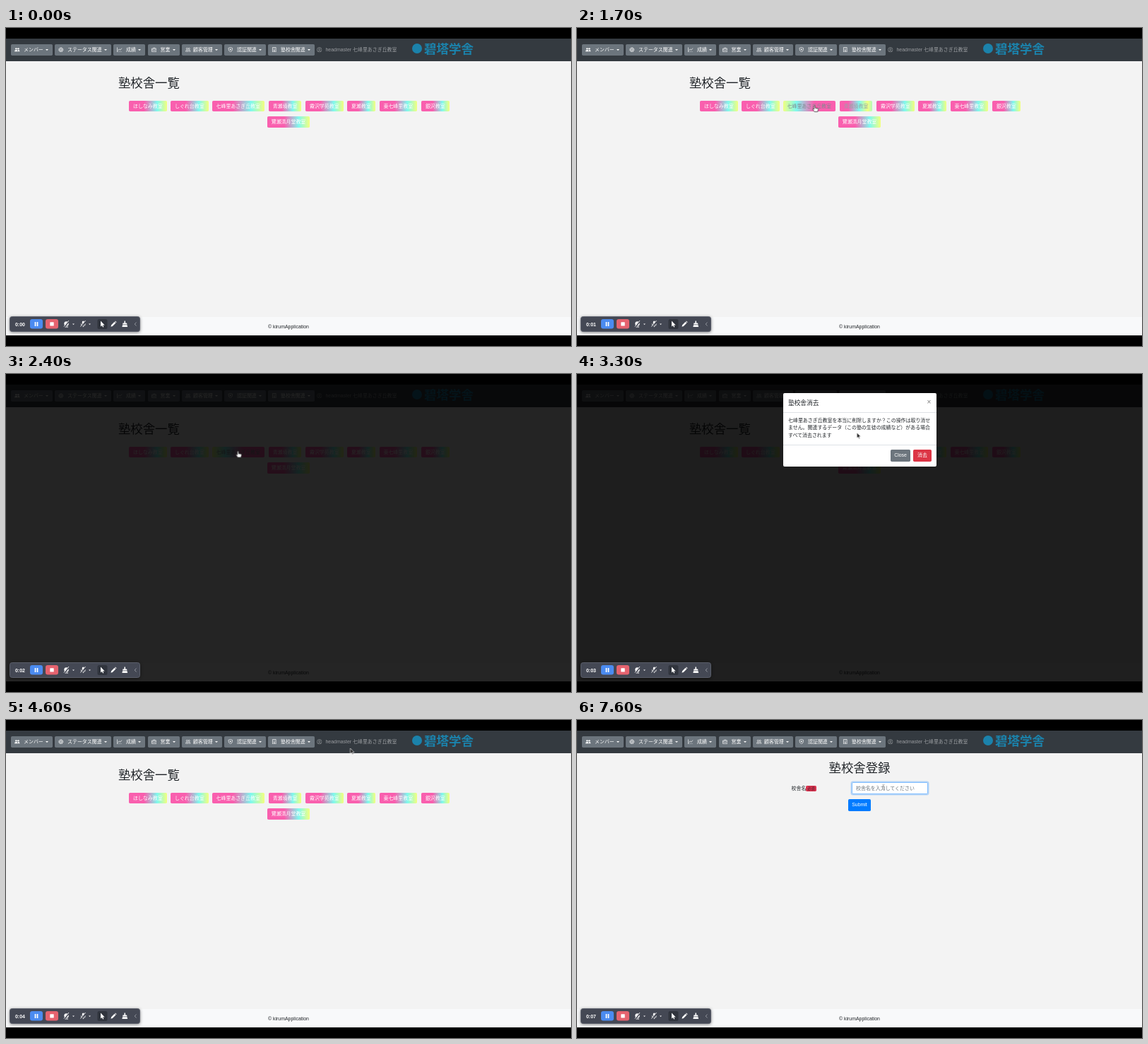
These frames come from a looping animation (800x450 px, 8000 ms). An HTML page:

```html
<!DOCTYPE html>
<html lang="ja">
<head>
<meta charset="utf-8">
<title>塾校舎一覧</title>
<style>
html, body { margin: 0; width: 100%; height: 100%; overflow: hidden; background: #000; }
body { font: 6.95px/16px "Liberation Sans", "Noto Sans CJK JP", "Noto Sans CJK", sans-serif; color: #212529; }
.stage { position: relative; width: 800px; height: 450px; overflow: hidden; }
.layer { position: absolute; inset: 0; }
.page { clip-path: inset(15px 0); background: #f3f3f3; }
.t, .btn, .box, svg.i { position: absolute; white-space: nowrap; }
.box { box-sizing: border-box; }
h1 { margin: 0; font-size: 17.36px; font-weight: 500; font-weight: 400; line-height: 24px; }

/* navigation */
.bar { left: 0; top: 15px; width: 800px; height: 32px; background: #343a40; }
.btn { left: var(--x); top: var(--y, 22.5px); width: var(--w); height: 16.5px; border-radius: 1.8px; color: #fff; background: #6c757d; text-align: center; }
.nav span { position: absolute; left: 18px; }
.nav svg { position: absolute; left: 5.2px; top: 4.4px; width: 7.6px; height: 7.6px; }
.nav::after { content: ""; position: absolute; right: 6px; top: 7px; border: 2px solid transparent; border-top-color: #fff; border-bottom: 0; }
.user { color: #9a9da0; }
.mark { left: 575px; top: 22px; width: 14px; height: 14px; border-radius: 50%; background: #1b82ab; }
.word { left: 592px; top: 18px; font-size: 17.5px; line-height: 24px; font-weight: 700; color: #1b82ab; }
.foot { left: 0; top: 409px; width: 800px; height: 26px; background: #f8f9fa; }

/* gradient buttons */
.pill {
  top: var(--y, 102.5px); height: 15.8px; line-height: 15.6px;
  background: linear-gradient(90deg, #f95fae 0 20%, #7ff8ee 37%, #f2ff80 50%, #7ff8ee 63%, #f95fae 80%) 0 0 / 200% 100%;
}

/* dropdown and dialog */
.menu { left: 371px; top: 40.5px; width: 70px; height: 35px; background: #fff; border: .5px solid #ccc; border-radius: 1.8px; }
.item { left: 371.5px; width: 69px; height: 14px; line-height: 13.5px; text-indent: 22.5px; }
.item svg { position: absolute; left: 10.5px; top: 3px; width: 7.6px; height: 7.6px; }
.shade { background: #000; }
.dialog { left: 292px; top: 27px; width: 217px; height: 104px; background: #fff; border-radius: 2px; }
.dialog hr { position: absolute; left: 0; width: 100%; margin: 0; border: 0; height: .5px; background: #dee2e6; }
.dialog p { position: absolute; left: 7px; top: 34px; margin: 0; line-height: 10.4px; }
.x { right: 0; top: 0; width: 21px; height: 25px; line-height: 25px; text-align: center; font-size: 10px; color: #808080; }
.x i { position: absolute; inset: 0; background: #1e1c1c; }

/* form */
.field { left: 389px; top: 88px; width: 108px; height: 17px; background: #fff; border: .6px solid #ced4da; border-radius: 1.8px; }
.glow { border-color: #80bdff; box-shadow: 0 0 0 1.5px rgba(0, 123, 255, .25); background: none; }
.badge { left: 324px; top: 93px; width: 15px; height: 8px; line-height: 8px; font-size: 5.2px; text-align: center; color: #451525; background: #dc3550; border-radius: 1.8px; }

/* recorder */
.clock { left: 13px; top: 414.5px; height: 9px; overflow: hidden; font-weight: 700; line-height: 9px; color: #fff; display: flex; }
.clock i { font-style: normal; width: 4px; white-space: pre-line; }

/* motion */
.a { animation: 8s linear infinite; }
.hard { animation: 8s step-end infinite; }
.list { animation-name: list; }
.form { animation-name: form; }
.drop { animation-name: drop; }
.pick { animation-name: pick; }
.focus { animation-name: focus; }
.caret { animation-name: caret; }
.digit { animation-name: digit; }
.shade { animation-name: shade; }
.fade { animation-name: fade; }
.slide { animation-name: slide; }
.dark { animation-name: dark; }
.sweep { animation-name: sweep; }
.brush { animation-name: brush; }
.move { animation-name: move; }
.arrow { animation-name: arrow; }
.hand { animation-name: hand; }
.beam { animation-name: beam; }
@keyframes list { 0% { opacity: 1 } 77.5%, 100% { opacity: 0 } }
@keyframes form { 0% { opacity: 0 } 77.5%, 100% { opacity: 1 } }
@keyframes drop { 0% { opacity: 0 } 66.25% { opacity: 1 } 77.5%, 100% { opacity: 0 } }
@keyframes pick { 0% { background: #fff; color: #212529 } 72.5%, 100% { background: #007bff; color: #fff } }
@keyframes focus { 0% { opacity: 0 } 88.75%, 100% { opacity: 1 } }
@keyframes caret { 0% { opacity: 0 } 88.75% { opacity: 1 } 95%, 100% { opacity: 0 } }
@keyframes digit {
  0% { transform: none } 15% { transform: translateY(-9px) } 27.5% { transform: translateY(-18px) }
  40% { transform: translateY(-27px) } 52.5% { transform: translateY(-36px) } 65% { transform: translateY(-45px) }
  77.5% { transform: translateY(-54px) } 90%, 100% { transform: translateY(-63px) }
}
@keyframes shade { 0%, 28.19% { opacity: 0 } 30.06%, 55.5% { opacity: .875 } 57.38%, 100% { opacity: 0 } }
@keyframes fade { 0%, 30.06% { opacity: 0 } 31.94%, 53.69% { opacity: 1 } 55.56%, 100% { opacity: 0 } }
@keyframes slide {
  0% { transform: translateY(-21.7px) }
  30.06% { transform: translateY(-21.7px); animation-timing-function: ease-out }
  33.81% { transform: none }
  53.69% { transform: none; animation-timing-function: ease-out }
  57.44%, 100% { transform: translateY(-21.7px) }
}
@keyframes dark { 0% { opacity: 0 } 49.5%, 100% { opacity: 1 } }
@keyframes sweep {
  0%, 18.75% { background-position: 0 0; color: #fff }
  21.25%, 30.5% { background-position: 100% 0; color: #808890 }
  36%, 100% { background-position: 0 0; color: #fff }
}
@keyframes brush {
  0%, 17.5% { background-position: 0 0; color: #fff }
  19.5% { background-position: 50% 0; color: #909aa0 }
  21.25% { background-position: 14% 0; color: #98a4a8 }
  24%, 100% { background-position: 0 0; color: #fff }
}
@keyframes move {
  0%, 8.75% { transform: translate(808px, 300px) }
  15% { transform: translate(541px, 165px) }
  18.75% { transform: translate(395px, 116px) }
  21.25% { transform: translate(336.5px, 110px) }
  26.25%, 36.25% { transform: translate(328.5px, 109.5px) }
  43.75% { transform: translate(430px, 70px) }
  50%, 55% { transform: translate(488.5px, 40px) }
  57.5%, 60% { transform: translate(487.5px, 40px) }
  65%, 67.5% { transform: translate(425px, 31px) }
  73.75%, 81.25% { transform: translate(417.5px, 64px) }
  85% { transform: translate(430px, 92px) }
  90%, 100% { transform: translate(434px, 95px) }
}
@keyframes arrow {
  0% { opacity: 1 } 18.2% { opacity: 0 } 30.5% { opacity: 1 } 49.5% { opacity: 0 } 56.25% { opacity: 1 }
  63% { opacity: 0 } 77.5% { opacity: 1 } 84.5%, 100% { opacity: 0 }
}
@keyframes hand {
  0% { opacity: 0 } 18.2% { opacity: 1 } 30.5% { opacity: 0 } 49.5% { opacity: 1 } 56.25% { opacity: 0 }
  63% { opacity: 1 } 77.5%, 100% { opacity: 0 }
}
@keyframes beam { 0% { opacity: 0 } 84.5%, 100% { opacity: 1 } }
</style>
</head>
<body>
<svg width="0" height="0" style="position:absolute">
  <defs fill="none">
    <symbol id="people" viewBox="0 0 16 16"><g fill="currentColor"><circle cx="5" cy="5" r="2.6"/><circle cx="11.5" cy="5" r="2.6"/><path d="M0 13q0-4.500 5-4.500t5 4.500zM11 13q0-3-1-4.300 6-.8 6 4.300z"/></g></symbol>
    <symbol id="gear" viewBox="0 0 16 16"><g fill="none" stroke="currentColor" stroke-width="1.400"><circle cx="8" cy="8" r="6.500" stroke-dasharray="3.400 1.700"/><circle cx="8" cy="8" r="5"/><circle cx="8" cy="8" r="2.200"/></g></symbol>
    <symbol id="graph" viewBox="0 0 16 16"><path d="M1 1v14h14M3 11l4-5 3 3 5-6" fill="none" stroke="currentColor" stroke-width="1.400"/></symbol>
    <symbol id="case" viewBox="0 0 16 16"><path d="M1 4.500h14v9H1zM5.500 4.500v-2h5v2M1 8q7 3 14 0" fill="none" stroke="currentColor" stroke-width="1.400"/></symbol>
    <symbol id="crowd" viewBox="0 0 16 16"><g fill="none" stroke="currentColor" stroke-width="1.300"><circle cx="5" cy="5" r="2.300"/><circle cx="11" cy="5" r="2.300"/><path d="M1 13q0-4 4-4t4 4zM9.500 9.500q5-1.500 5.500 3.500h-4"/></g></symbol>
    <symbol id="shield" viewBox="0 0 16 16"><path d="M8 1l6 2q.5 9-6 12-6.500-3-6-12z" fill="none" stroke="currentColor" stroke-width="1.400"/><path d="M8 5v5M6 7h4" stroke="currentColor" stroke-width="1.800"/></symbol>
    <symbol id="house" viewBox="0 0 16 16"><path d="M3 1h10v14H9.500v-3h-3v3H3zM5.500 4h1.500M9 4h1.500M5.500 7h1.500M9 7h1.500M5.500 10h5" fill="none" stroke="currentColor" stroke-width="1.400"/></symbol>
    <symbol id="rows" viewBox="0 0 16 16"><path d="M1 2h6M1 6h5M1 10h6M1 14h5M10 1h4v14h-4z" fill="none" stroke="currentColor" stroke-width="1.600"/></symbol>
    <symbol id="face" viewBox="0 0 16 16"><g fill="none" stroke="currentColor" stroke-width="1.300"><circle cx="8" cy="8" r="7"/><circle cx="8" cy="6.500" r="2.500"/><path d="M3.500 13q4.500-5 9 0"/></g></symbol>
  </defs>
</svg>

<div class="stage">
  <div class="layer page">
    <div class="box foot"></div>
    <div class="t" style="left:371px;top:414.500px">© kirumApplication</div>

    <div class="layer hard list">
      <h1 class="t" style="left:159px;top:66px">塾校舎一覧</h1>
      <div class="btn pill" style="--x:174px;--w:53.500px">ほしなみ教室</div>
      <div class="btn pill" style="--x:233px;--w:53.500px">しぐれ台教室</div>
      <div class="btn pill a sweep" style="--x:292px;--w:73.500px">七峰里あさぎ丘教室</div>
      <div class="btn pill a brush" style="--x:372px;--w:46px">青瀬境教室</div>
      <div class="btn pill" style="--x:424px;--w:53.500px">霧沢学苑教室</div>
      <div class="btn pill" style="--x:483px;--w:39.500px">夏瀬教室</div>
      <div class="btn pill" style="--x:528.500px;--w:53.500px">東七峰里教室</div>
      <div class="btn pill" style="--x:588px;--w:39.500px">銀沢教室</div>
      <div class="btn pill" style="--x:370px;--y:125px;--w:60px">鷺瀬清月堂教室</div>
    </div>

    <div class="layer hard form">
      <h1 class="t" style="left:356.600px;top:55.500px">塾校舎登録</h1>
      <div class="t" style="left:303.500px;top:89px">校舎名</div>
      <div class="box badge">必須</div>
      <div class="box field"></div>
      <div class="box field glow hard focus"></div>
      <div class="t" style="left:395px;top:89px;color:#6c757d">校舎名を入力してください</div>
      <div class="box hard caret" style="left:394.500px;top:93px;width:.6px;height:8px;background:#222"></div>
      <div class="btn" style="--x:384px;--y:112px;--w:32px;background:#007bff">Submit</div>
    </div>

    <div class="box bar"></div>
    <div class="btn nav" style="--x:7px;--w:59px"><svg><use href="#people"/></svg><span>メンバー</span></div>
    <div class="btn nav" style="--x:69px;--w:80px"><svg><use href="#gear"/></svg><span>ステータス関連</span></div>
    <div class="btn nav" style="--x:152px;--w:45px"><svg><use href="#graph"/></svg><span>成績</span></div>
    <div class="btn nav" style="--x:200.500px;--w:45px"><svg><use href="#case"/></svg><span>営業</span></div>
    <div class="btn nav" style="--x:249px;--w:57px"><svg><use href="#crowd"/></svg><span style="left:16px">顧客管理</span></div>
    <div class="btn nav" style="--x:309px;--w:59px"><svg><use href="#shield"/></svg><span>認証関連</span></div>
    <div class="btn nav" style="--x:371px;--w:66px"><svg><use href="#house"/></svg><span>塾校舎関連</span></div>
    <svg class="i user" style="left:440px;top:27px" width="7.500" height="7.500"><use href="#face"/></svg>
    <div class="t user" style="left:452.500px;top:22.500px">headmaster</div>
    <div class="t user" style="left:491px;top:22.500px">七峰里あさぎ丘教室</div>
    <div class="box mark"></div>
    <div class="t word">碧塔学舎</div>

    <div class="layer hard drop">
      <div class="box" style="left:369.600px;top:21.100px;width:68.800px;height:19.300px;border:1.400px solid rgba(130,138,145,.5);border-radius:3px"></div>
      <div class="box menu"></div>
      <div class="box item" style="top:44px"><svg><use href="#rows"/></svg>塾校舎一覧</div>
      <div class="box item hard pick" style="top:58px"><svg><use href="#house"/></svg>塾校舎作成</div>
    </div>

    <div class="layer shade a"></div>
    <div class="layer a fade">
      <div class="box dialog a slide">
        <div class="t" style="left:7px;top:5.500px;font-size:8.680px">塾校舎消去</div>
        <div class="box x">×<i class="hard dark"></i></div>
        <hr style="top:27px">
        <p>七峰里あさぎ丘教室を本当に削除しますか？この操作は取り消せ<br>ません。関連するデータ（この塾の生徒の成績など）がある場合<br>すべて消去されます</p>
        <hr style="top:73px">
        <div class="btn" style="--x:152px;--y:80.300px;--w:28px">Close</div>
        <div class="btn" style="--x:184px;--y:80.300px;--w:26px;background:#dc3545">消去</div>
      </div>
    </div>
  </div>

  <svg class="i" style="left:0;top:400px;filter:drop-shadow(0 1px 2px rgba(0,0,0,.45))" width="200" height="38" viewBox="0 400 200 38">
    <rect x="5.500" y="408.500" width="184" height="21" rx="3" fill="#444854" stroke="#5b5f6b"/>
    <rect x="34" y="412" width="18" height="13.500" rx="3" fill="#4b8bf0"/>
    <path d="M41.500 416v6M44.500 416v6" stroke="#fff" stroke-width="1.700"/>
    <rect x="56" y="412" width="18" height="13.500" rx="3" fill="#e5636f"/>
    <rect x="62.300" y="416.200" width="5.400" height="5.400" rx=".6" fill="#fff"/>
    <rect x="129.500" y="412" width="14" height="14" rx="2.500" fill="#30343d"/>
    <g fill="#fff">
      <circle cx="85.500" cy="418.500" r="3.200"/>
      <path d="M83 422.500h5v1h-5zM94 418.500h3l-1.500 1.600zM117 418.500h3l-1.500 1.600z"/>
      <rect x="107.800" y="414.500" width="3" height="5.500" rx="1.500"/>
      <path d="M134 414.500v8l1.900-1.600 1.300 2.700 1.200-.6-1.300-2.600h2.600z"/>
      <path d="M148.500 422.700l.6-2.400 4.500-4.500 1.800 1.800-4.500 4.500zM154.200 415.200l.7-.6 1.700 1.700-.6.7z"/>
      <path d="M167.500 414.500h1.500v3h2l.5 2h-6.500l.5-2h2zM165 420.200h6.500l.6 2.800h-7.700z"/>
    </g>
    <path d="M106.200 418.500q0 3.200 3.100 3.200t3.100-3.200M109.300 421.700v1.500" fill="none" stroke="#fff" stroke-width=".8"/>
    <path d="M82.500 423l7-8.500M106 423l7-8.500" stroke="#444854" stroke-width="2"/>
    <path d="M82 422.500l7-8.500M105.500 422.500l7-8.500" stroke="#fff" stroke-width=".9"/>
    <path d="M184.500 416.500l-2.300 2.500 2.300 2.500" fill="none" stroke="#9a9da6" stroke-width=".9"/>
  </svg>
  <div class="t clock">0:0<i class="hard digit">0<br>1<br>2<br>3<br>4<br>5<br>6<br>7</i></div>

  <svg class="i a move" style="left:0;top:0;overflow:visible" width="1" height="1">
    <path class="hard arrow" d="M0 0v7.500l1.800-1.500 1.200 2.800 1.200-.5L3 5.600h2.400z" fill="#222" stroke="#fff" stroke-width=".6"/>
    <path class="hard hand" d="M-.9.6C-.9-.4.9-.4.9.6v2.600l3.100.6c1 .2 1.200.8 1 1.800l-.8 3h-4.400l-2.400-3.200c-.4-.8.600-1.400 1.200-.6l.5.400z" fill="#fff" stroke="#222" stroke-width=".7"/>
    <path class="hard beam" d="M-1.500-3.500q1.500 0 1.500 1v5q0 1-1.500 1M1.500-3.500Q0-3.500 0-2.500M1.500 3.500Q0 3.500 0 2.500" fill="none" stroke="#777" stroke-width=".6"/>
  </svg>
</div>
</body>
</html>
```
